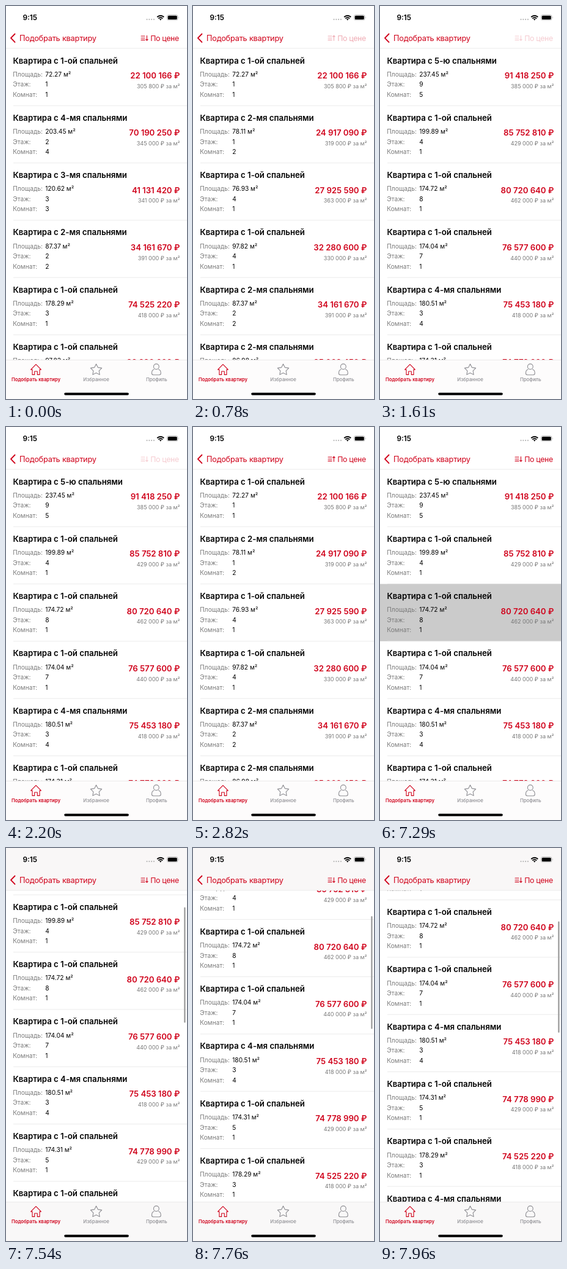
Recreate the animation shown at these times as an HTML page. Size 296 px wide and 640 px high, loop 8000 ms.

```html
<!DOCTYPE html>
<html lang="ru">
<head>
<meta charset="utf-8">
<title>Подобрать квартиру</title>
<style>
  html, body { margin: 0; width: 100%; height: 100%; overflow: hidden; background: #fff; }
  svg { display: block; width: 100%; height: 100%; font-family: Inter, sans-serif; }
  .red { fill: #d0021b; }
  .end { text-anchor: end; }
  .nav { font-size: 12.75px; letter-spacing: -.2px; }
  .sort { font-size: 12.2px; letter-spacing: -.2px; }
  .title { font-size: 13.2px; font-weight: 600; }
  .price { font-size: 13.15px; font-weight: 600; }
  .field { font-size: 10.2px; }
  .label { fill: #7b7b7b; }
  .rate { font-size: 9px; fill: #777; }
  .tab { font-size: 7.8px; font-weight: 500; text-anchor: middle; fill: #8e8e93; }
  .tab.red { font-size: 7.7px; font-weight: 600; fill: #d0021b; }
  .icon { fill: none; stroke: #8e8e93; stroke-width: 1.1; stroke-linejoin: round; stroke-linecap: round; }
  .icon.red { fill: none; stroke: #d0021b; }
  .line { stroke: #e6e6e6; stroke-width: .8; }
</style>
</head>
<body>
<svg viewBox="0 0 296 640">
  <rect width="296" height="640" fill="#fff"/>
  <g id="list"></g>

  <rect id="header" width="296" height="69"/>
  <path class="line" d="M0 69H296"/>
  <text x="27.4" y="23" font-size="11.8" font-weight="600">9:15</text>
  <g fill="#b5b5b5">
    <circle cx="230.5" cy="21.8" r="1.1"/><circle cx="234.3" cy="21.8" r="1.1"/>
    <circle cx="238.1" cy="21.8" r="1.1"/><circle cx="241.9" cy="21.8" r="1.1"/>
  </g>
  <g fill="none" stroke="#000" stroke-width="1.8">
    <path d="M247.2 18a7.8 7.8 0 0 1 11 0"/>
    <path d="M249.3 20.3a4.8 4.8 0 0 1 6.8 0"/>
  </g>
  <path d="M252.7 23.5l-1.8-1.9a2.6 2.6 0 0 1 3.6 0z"/>
  <rect x="263.5" y="14.5" width="17.4" height="8.6" rx="2.5" fill="none" stroke="#aaa" stroke-width=".8"/>
  <rect x="264.7" y="15.7" width="15" height="6.2" rx="1.5"/>
  <path d="M282 17.3q1.4 1.5 0 3z" fill="#aaa"/>

  <path d="M14.5 45.5L8 52.2l6.5 6.7" fill="none" stroke="#d0021b" stroke-width="1.9" stroke-linecap="round" stroke-linejoin="round"/>
  <text class="nav red" x="22" y="56.8">Подобрать квартиру</text>
  <g id="sort">
    <path class="icon red" d="M221 49H227M221 52.2H227M221 55.4H227"/>
    <path id="arrow" class="icon red" d="M230.4 48.2V56.2M228.7 54.4L230.4 56.2L232.1 54.4"/>
    <text class="sort red end" x="283" y="56.8">По цене</text>
  </g>

  <rect id="footer" y="576.5" width="296" height="63.5"/>
  <path class="line" d="M0 576.5H296"/>
  <path class="icon red" d="M40.6 592.1L49 583.6L57.4 592.1H55V600.4H51.3V595H46.7V600.4H43V592.1Z"/>
  <path id="star" class="icon"/>
  <circle class="icon" cx="245.8" cy="587.3" r="4.4"/>
  <path class="icon" d="M242 591.8C239.5 592.6 238.4 595 238.4 598Q238.4 600.7 241 600.7H250.6Q253.2 600.7 253.2 598C253.2 595 252 592.6 249.6 591.8"/>
  <text class="tab red" x="49" y="611">Подобрать квартиру</text>
  <text class="tab" x="147.5" y="611">Избранное</text>
  <text class="tab" x="246.3" y="611">Профиль</text>
  <rect x="95.2" y="629.8" width="105.6" height="4" rx="2"/>
  <rect id="scrollbar" x="291.1" width="2.4" rx="1.2" fill="#a0a0a0"/>
</svg>
<script>
const LOOP = 8000, TOP = 69, ROW = 93.3;
const $ = id => document.getElementById(id);
const BEDROOMS = ['', '1-ой спальней', '2-мя спальнями', '3-мя спальнями', '4-мя спальнями', '5-ю спальнями'];

// bedrooms, area, floor, price, price per square metre
const flats = [
  [1, '72.27', 1, 22100166, 305800],
  [4, '203.45', 2, 70190250, 345000],
  [3, '120.62', 3, 41131420, 341000],
  [2, '87.37', 2, 34161670, 391000],
  [1, '178.29', 3, 74525220, 418000],
  [1, '97.82', 4, 32280600, 330000],
  [5, '237.45', 9, 91418250, 385000],
  [1, '199.89', 4, 85752810, 429000],
  [1, '174.72', 8, 80720640, 462000],
  [1, '174.04', 7, 76577600, 440000],
  [4, '180.51', 3, 75453180, 418000],
  [1, '174.31', 5, 74778990, 429000],
  [2, '78.11', 1, 24917090, 319000],
  [1, '76.93', 4, 27925590, 363000],
  [2, '86.98', 3, 35009450, 402500]
];
const ascending = [...flats].sort((a, b) => a[3] - b[3]);
const descending = [...ascending].reverse();

const taps = [
  { down: 500, up: 670, order: ascending },
  { down: 1430, up: 1610, order: descending },
  { down: 2200, up: 2380, order: ascending },
  { down: 3200, up: 3380, order: descending }
];
const PRESS = 7290, DRAG = 7420;
const scrollTimes = [DRAG, 7540, 7660, 7760, 7860, 7960];

const money = n => String(n).replace(/\B(?=(\d{3})+$)/g, ' ') + ' ₽';
const text = (cls, x, y, s) => `<text class="${cls}" x="${x}" y="${y}">${s}</text>`;

function rowMarkup([rooms, area, floor, price, rate], i) {
  const fields = [['Площадь:', area + ' м²'], ['Этаж:', floor], ['Комнат:', rooms]];
  return `<g transform="translate(0 ${TOP + i * ROW})">
    <rect class="back" width="296" height="${ROW}" fill="none"/>
    <path class="line" d="M12 ${ROW}H296"/>` +
    text('title', 11.5, 24.5, 'Квартира с ' + BEDROOMS[rooms]) +
    fields.map(([label, value], k) =>
      text('field label', 11.3, 45.8 + k * 16.5, label) +
      text('field', 64.2, 45.8 + k * 16.5, value)).join('') +
    text('price red end', 284.4, 49.2, money(price)) +
    text('rate end', 284.4, 64.8, money(rate) + ' за м²') + '</g>';
}

let shown;
function showList(order) {
  if (order === shown) return;
  shown = order;
  $('list').innerHTML = order.map(rowMarkup).join('');
}

function buttonOpacity(t) {
  const tap = taps.findLast(p => t >= p.down);
  if (!tap) return 1;
  if (t < tap.up) return .2;
  const p = Math.min(4, Math.floor((t - tap.up) / 107)) / 4;
  return .2 + .8 * p * p * (3 - 2 * p);
}

// A short drag, then inertia that decays over 500 ms.
function scrollOffset(t) {
  if (t < DRAG) return 0;
  const at = scrollTimes.findLast(s => t >= s);
  return at === DRAG ? 44 : 86 + 149.6 * (1 - Math.exp((7540 - at) / 500));
}

function draw(t) {
  const done = taps.findLast(p => t >= p.up);
  const order = done ? done.order : flats;
  const offset = scrollOffset(t);
  const moving = offset > 0;

  showList(order);
  $('list').setAttribute('transform', `translate(0 ${-offset})`);
  document.querySelectorAll('.back')[2].setAttribute('fill', t >= PRESS && !moving ? '#cbcbcb' : 'none');

  $('sort').setAttribute('opacity', buttonOpacity(t));
  $('arrow').setAttribute('transform', order === ascending ? 'matrix(1 0 0 -1 0 104.4)' : '');

  $('header').setAttribute('fill', moving ? '#f9f7f7' : '#fff');
  $('footer').setAttribute('fill', moving ? '#f9f8f8' : '#fdfcfc');

  const bar = $('scrollbar'), travel = offset - 86;
  bar.setAttribute('opacity', moving ? 1 : 0);
  bar.setAttribute('y', 96.5 + travel * .27);
  bar.setAttribute('height', 188 - travel * .08);
}

$('star').setAttribute('d', 'M' + Array.from({ length: 10 }, (_, i) => {
  const a = i * Math.PI / 5, r = i % 2 ? 4.9 : 9.6;
  return `${147.5 + r * Math.sin(a)} ${592.6 - r * Math.cos(a)}`;
}).join('L') + 'Z');

function tick() {
  draw(performance.now() % LOOP);
  requestAnimationFrame(tick);
}
tick();
</script>
</body>
</html>
```
